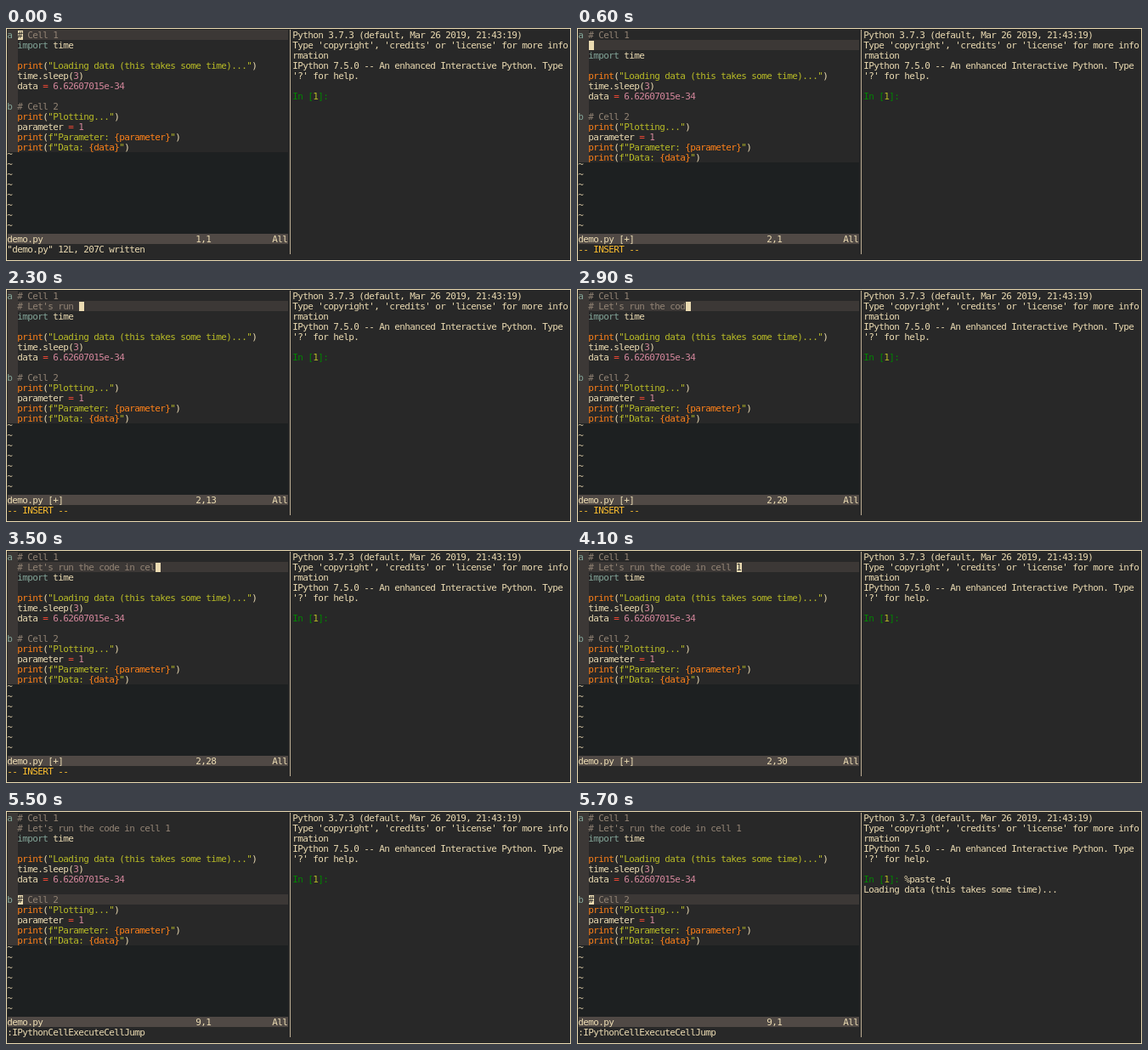
An HTML page with a canvas for the animation above (8000 ms loop, 665 by 274 pixels).

```html
<!DOCTYPE html>
<html lang="en">
<head>
<meta charset="utf-8">
<title>Terminal session</title>
<style>
html, body { margin: 0; width: 100%; height: 100%; overflow: hidden; background: #282828; }
canvas { display: block; }
</style>
</head>
<body>
<canvas id="term" width="665" height="274"></canvas>
<script>
const ctx = document.getElementById('term').getContext('2d');
const LOOP = 8000, CW = 6, CH = 12, PAD = 2, RIGHT = 56;
const BG = '#282828', FG = '#ebdbb2', LINE = '#3c3836';

// One-letter colour keys used as prefixes in the marked-up lines
const colors = {
  w: FG, c: '#928374', o: '#fe8019', g: '#b8bb26', p: '#d3869b', r: '#fb4934',
  b: '#83a598', y: '#fabd2f', n: '#008700', t: '#d5c4a1', k: BG
};

const code = [
  'c# Cell 1',
  'bimport|w time',
  '',
  'oprint|w(|g"Loading data (this takes some time)..."|w)',
  'wtime.sleep(|p3|w)',
  'wdata |r=|p 6.62607015e-34',
  '',
  'c# Cell 2',
  'oprint|w(|g"Plotting..."|w)',
  'wparameter |r=|p 1',
  'oprint|w(|gf"Parameter: |o{parameter}|g"|w)',
  'oprint|w(|gf"Data: |o{data}|g"|w)'
];
const banner = [
  'wPython 3.7.3 (default, Mar 26 2019, 21:43:19)',
  "wType 'copyright', 'credits' or 'license' for more info",
  'wrmation',
  'wIPython 7.5.0 -- An enhanced Interactive Python. Type',
  "w'?' for help."
];
const comment = "# Let's run the code in cell 1";

// Moments at which each character of the comment appears
const every = (from, count) => Array.from({ length: count }, (_, i) => from + i * 100);
const keys = [
  800, 1100, ...every(1400, 14), 2800, ...every(2800, 3), 3100, ...every(3100, 3),
  3400, ...every(3400, 2), ...every(3700, 3)
];

const px = col => PAD + col * CW;
const py = row => PAD + row * CH;

function fill(col, row, cols, rows, color) {
  ctx.fillStyle = color;
  ctx.fillRect(px(col), py(row), cols * CW, rows * CH);
}

function put(col, row, marked, dy = 0) {
  for (const part of marked.split('|')) {
    ctx.fillStyle = colors[part[0]];
    for (const ch of part.slice(1)) {
      if (ch !== ' ') ctx.fillText(ch, px(col) + 2.5, py(row) + 10 + dy);
      col++;
    }
  }
}

function cursor(col, row, ch) {
  ctx.fillStyle = FG;
  ctx.fillRect(px(col), py(row) + 1, CW, CH - 1);
  put(col, row, 'k' + ch);
}

function commandLine(t) {
  if (t < 500) return 'w"demo.py" 12L, 207C written';
  if (t < 4100) return 'y-- INSERT --';
  if (t < 4200) return '';
  if (t < 4400) return 'w:';
  if (t < 4500) return 'w:w';
  if (t < 5500) return 'w"demo.py" 13L, 238C written';
  return 'w:IPythonCellExecuteCellJump';
}

function editor(t) {
  const opened = t >= 500, jumped = t >= 5500;
  const typed = keys.filter(k => k <= t).length;
  const lines = code.slice();
  if (opened) lines.splice(1, 0, 'c' + comment.slice(0, typed));

  const row = jumped ? 8 : opened ? 1 : 0;
  const pos = !opened || jumped ? 0 : t < 4100 ? typed : typed - 1;

  fill(0, 0, 2, lines.length, LINE);
  fill(0, row, 55, 1, LINE);
  fill(0, lines.length, 55, 20 - lines.length, '#1d2021');
  lines.forEach((line, i) => put(2, i, line));
  for (let i = lines.length; i < 20; i++) put(0, i, 't~', -4);
  put(0, 0, 'ba');
  put(0, opened ? 8 : 7, 'bb');

  fill(0, 20, 55, 1, '#504945');
  put(0, 20, 'wdemo.py' + (opened && t < 4500 ? ' [+]' : ''));
  put(37, 20, `w${row + 1},${pos + 1}`);
  put(52, 20, 'wAll');

  const command = commandLine(t);
  put(0, 21, command);
  if (t >= 5200 && t < 5500) put(44, 21, 'w,');

  if (t >= 4200 && t < 4500) cursor(command.length - 1, 21, ' ');
  else cursor(pos + 2, row, opened && !jumped ? comment.slice(0, typed)[pos] || ' ' : '#');
}

function shell(t) {
  banner.forEach((line, i) => put(RIGHT, i, line));
  put(RIGHT, 6, 'nIn [|g1|n]:' + (t >= 5600 ? '|w %paste -q' : ''));
  if (t >= 5700) put(RIGHT, 7, 'wLoading data (this takes some time)...');
}

function draw(t) {
  ctx.font = '11px "DejaVu Sans Mono", monospace';
  ctx.textAlign = 'center';
  ctx.fillStyle = BG;
  ctx.fillRect(0, 0, 665, 274);
  ctx.strokeStyle = FG;
  ctx.strokeRect(0.5, 0.5, 664, 273);
  ctx.fillStyle = '#bdae93';
  ctx.fillRect(334, 2, 1, 264);
  editor(t);
  shell(t);
}

const start = performance.now();
function tick() {
  draw((performance.now() - start) % LOOP);
  requestAnimationFrame(tick);
}
tick();
</script>
</body>
</html>
```
